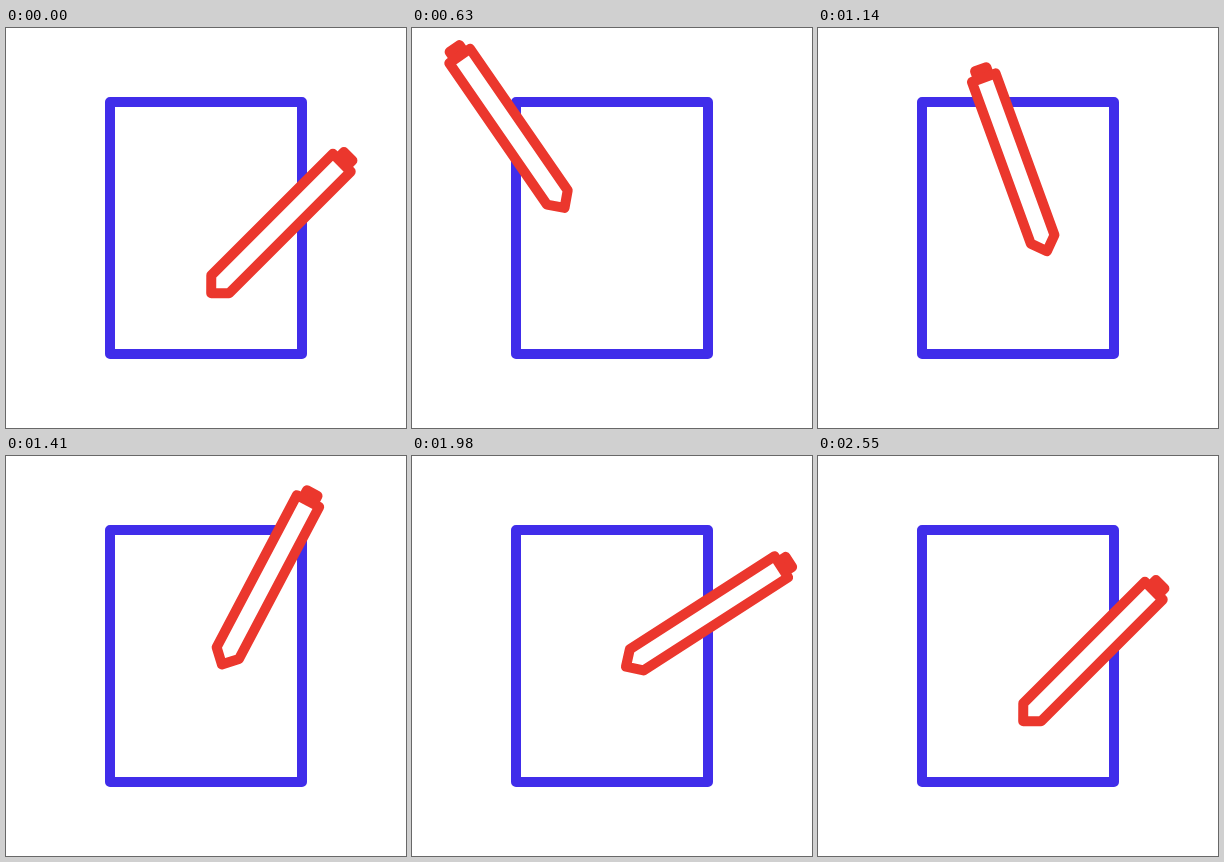
Animation of 400 by 400 pixels, one loop 2610 ms. Source, as an HTML page:

```html
<!DOCTYPE html>
<html lang="en">
<head>
<meta charset="utf-8">
<title>Pencil and paper</title>
<style>
  html, body { margin: 0; width: 100%; height: 100%; overflow: hidden; background: #fff; }
  svg { display: block; width: 100%; height: 100%; }
  .line { fill: #fff; stroke-width: 10; stroke-linejoin: round; stroke-linecap: round; }
  .paper { stroke: #402dea; }
  .pencil { stroke: #eb372d; }
  .cap { fill: #eb372d; }
</style>
</head>
<body>
<svg viewBox="0 0 400 400">
  <rect class="line paper" x="104" y="74" width="192" height="252"/>
  <g id="pencil">
    <path class="line pencil cap" d="M-6-88V-95H6V-88Z"/>
    <path class="line pencil" d="M-12.6-86H12.6V86L0 98.7L-12.6 86Z"/>
  </g>
</svg>
<script>
  const LOOP = 2610, STEP = 30;

  // time, centre x, centre y, angle
  const poses = [
    [0, 275, 195.5, 45],
    [360, 187.2, 155.5, 7.4],
    [540, 113.5, 103.7, -28],
    [600, 92.5, 94.2, -35.3],
    [630, 96.5, 98.7, -34.6],
    [1080, 171.7, 135, -31.2],
    [1140, 195.2, 130.5, -20],
    [1620, 285.5, 118, 53.5],
    [1770, 284.2, 124.7, 60],
    [2070, 300.5, 174, 55.6],
    [2160, 298.6, 189.3, 54],
    [2190, 296.5, 194.2, 53.4],
    [2400, 269.5, 200, 47.5],
    [2550, 275, 195.5, 45]
  ];

  const slope = (i, k) =>
    (poses[i + 1][k] - poses[i][k]) / (poses[i + 1][0] - poses[i][0]);

  // Tangent that never overshoots: flat at turning points and both ends
  function tangent(i, k) {
    if (i === 0 || i === poses.length - 1) return 0;
    const a = slope(i - 1, k), b = slope(i, k);
    return a * b <= 0 ? 0 : 2 * a * b / (a + b);
  }

  function valueAt(t, k) {
    const last = poses.length - 1;
    if (t >= poses[last][0]) return poses[last][k];
    const i = poses.findIndex(p => p[0] > t) - 1;
    const [p, q] = [poses[i], poses[i + 1]];
    const d = q[0] - p[0], s = (t - p[0]) / d, r = 1 - s;
    return r * r * ((1 + 2 * s) * p[k] + s * d * tangent(i, k))
         + s * s * ((1 + 2 * r) * q[k] - r * d * tangent(i + 1, k));
  }

  const pencil = document.getElementById('pencil');
  const start = performance.now();

  function draw() {
    const elapsed = (performance.now() - start) % LOOP;
    const t = Math.floor(elapsed / STEP) * STEP;
    const [x, y, angle] = [1, 2, 3].map(k => valueAt(t, k).toFixed(2));
    pencil.setAttribute('transform', `translate(${x} ${y}) rotate(${angle})`);
    requestAnimationFrame(draw);
  }
  draw();
</script>
</body>
</html>
```
